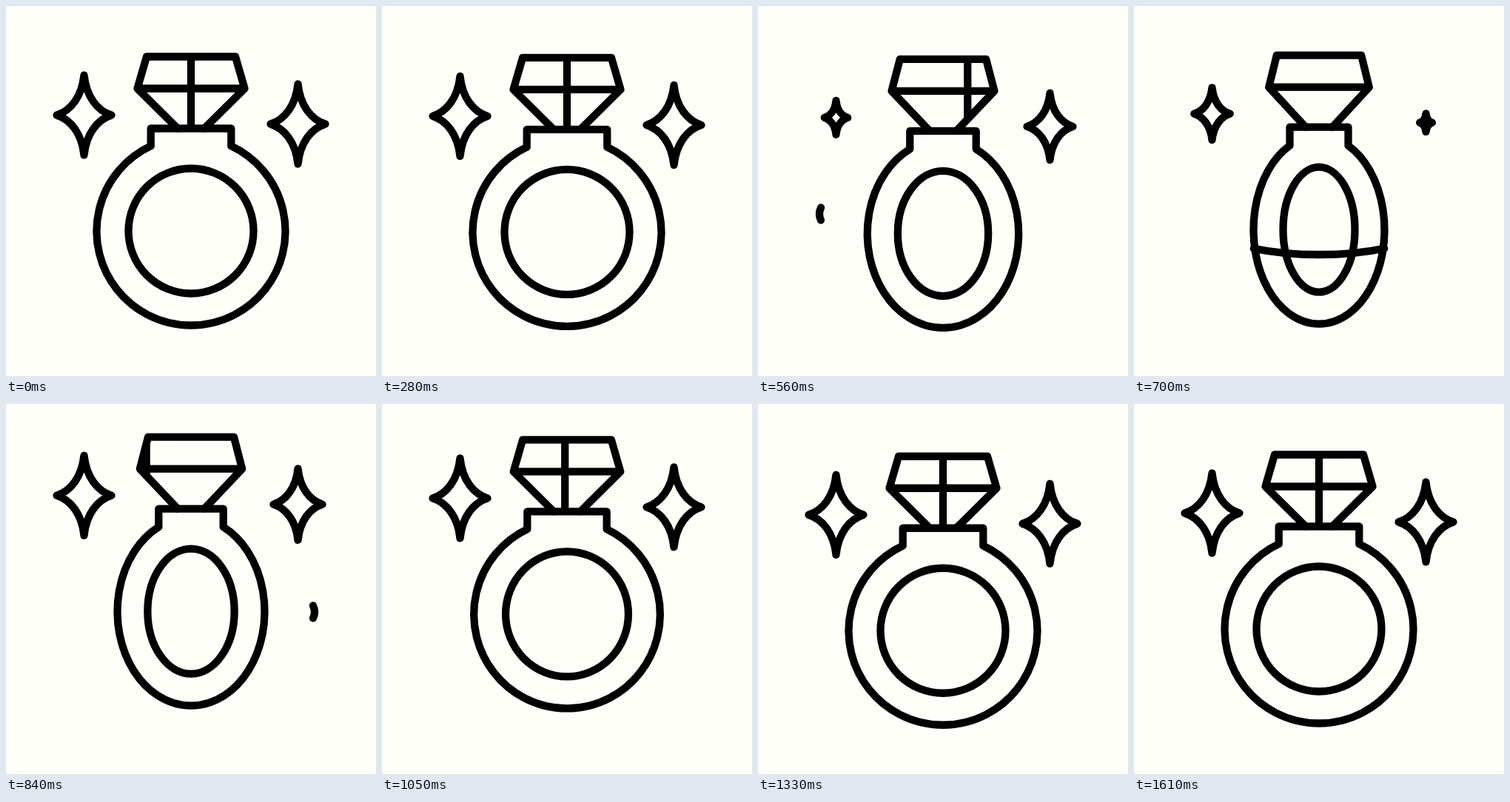
These frames come from a looping animation (500x500 px, 1.82 s). An HTML page:

```html
<!DOCTYPE html>
<html lang="en">
<head>
<meta charset="utf-8">
<title>Spinning ring</title>
<style>
  html, body { margin: 0; width: 100%; height: 100%; overflow: hidden; background: #fffffa; }
  svg { display: block; width: 100vw; height: 100vh; }
  #art { fill: none; stroke: #000; stroke-width: 10.3; stroke-linecap: round; stroke-linejoin: round; }
</style>
</head>
<body>
<svg viewBox="0 0 500 500">
  <defs><clipPath id="gemClip"><path id="gemArea"/></clipPath></defs>
  <g id="art">
    <g id="all">
      <path id="starL"/>
      <path id="starR"/>
      <g transform="translate(250 0)">
        <g clip-path="url(#gemClip)"><path id="facet"/></g>
        <path id="gem"/>
        <path id="band"/>
        <ellipse id="hole" cy="304" ry="84.5"/>
      </g>
    </g>
    <path id="swoosh"/>
  </g>
</svg>
<script>
const LOOP = 1820, STEP = 70;
const $ = id => document.getElementById(id);
const draw = (id, d) => $(id).setAttribute('d', d);

const clamp = x => Math.min(1, Math.max(0, x));
const span = (t, a, b) => clamp((t - a) / (b - a));
const smooth = x => x * x * (3 - 2 * x);
const ease = (t, a, b) => smooth(span(t, a, b));

// Eased track through [time, value] keys
function track(t, keys) {
  let v = keys[0][1];
  for (let i = 1; i < keys.length; i++) {
    v += (keys[i][1] - keys[i - 1][1]) * ease(t, keys[i - 1][0], keys[i][0]);
  }
  return v;
}

const LIFT = [[0, 0], [630, 3.5], [895, -27.3], [1390, 3.5], [1610, 0]];
const TURN = [[350, 0], [700, 1], [1100, 0]];

function star(id, cx, cy, t) {
  const grow = 1 - (1 - span(t, 630, 840)) ** 2;
  const s = 1 - 0.776 * (ease(t, 420, 630) - grow);
  const p = (x, y) => `${cx + x * s} ${cy + y * s}`;
  draw(id, `M${p(0, -54)}
    C${p(3, -25)} ${p(18, -6)} ${p(37, 0)}
    C${p(18, 6)} ${p(3, 25)} ${p(0, 54)}
    C${p(-3, 25)} ${p(-18, 6)} ${p(-37, 0)}
    C${p(-18, -6)} ${p(-3, -25)} ${p(0, -54)}Z`);
}

function ring(t) {
  const k = track(t, TURN);
  const rx = 127.5 - 39 * k, neck = 54.3 - 14.8 * k;
  const side = 72.5 - 4.7 * k, top = 60 - 2.8 * k;
  const y = 304.3 - 127.2 * Math.sqrt(1 - (neck / rx) ** 2);

  const crown = `M${-side} 111.5L${-top} 68.5H${top}L${side} 111.5`;
  draw('gemArea', `${crown}L18 165.5H-18Z`);
  draw('gem', `${crown}L18 165.5M-18 165.5L${-side} 111.5H${side}`);
  draw('band', `M${-neck} ${y}V165.5H${neck}V${y}A${rx} 127.2 0 1 1 ${-neck} ${y}`);
  $('hole').setAttribute('rx', 84.5 - 36 * k);

  // The facet leaves on the right and comes back from the left
  const x = t < 745 ? 73 * ease(t, 400, 740) : 73 * (ease(t, 750, 1090) - 1);
  draw('facet', `M${x} 68.5V165.5`);
}

function swoosh(t) {
  const head = ease(t, 499, 829), tail = ease(t, 571, 901);
  if (head - tail < 0.005) return draw('swoosh', '');
  const at = p => {
    const a = (189 - 198 * p) * Math.PI / 180;
    return `${250 + 167 * Math.cos(a)} ${281 + 55 * Math.sin(a)}`;
  };
  draw('swoosh', `M${at(tail)}A167 55 0 0 0 ${at(head)}`);
}

function render() {
  const t = Math.floor(performance.now() % LOOP / STEP) * STEP;
  $('all').setAttribute('transform', `translate(0 ${track(t, LIFT)})`);
  star('starL', 105.5, 147.5, t);
  star('starR', 394.5, 159.5, t - 78);
  ring(t);
  swoosh(t);
  requestAnimationFrame(render);
}
render();
</script>
</body>
</html>
```
